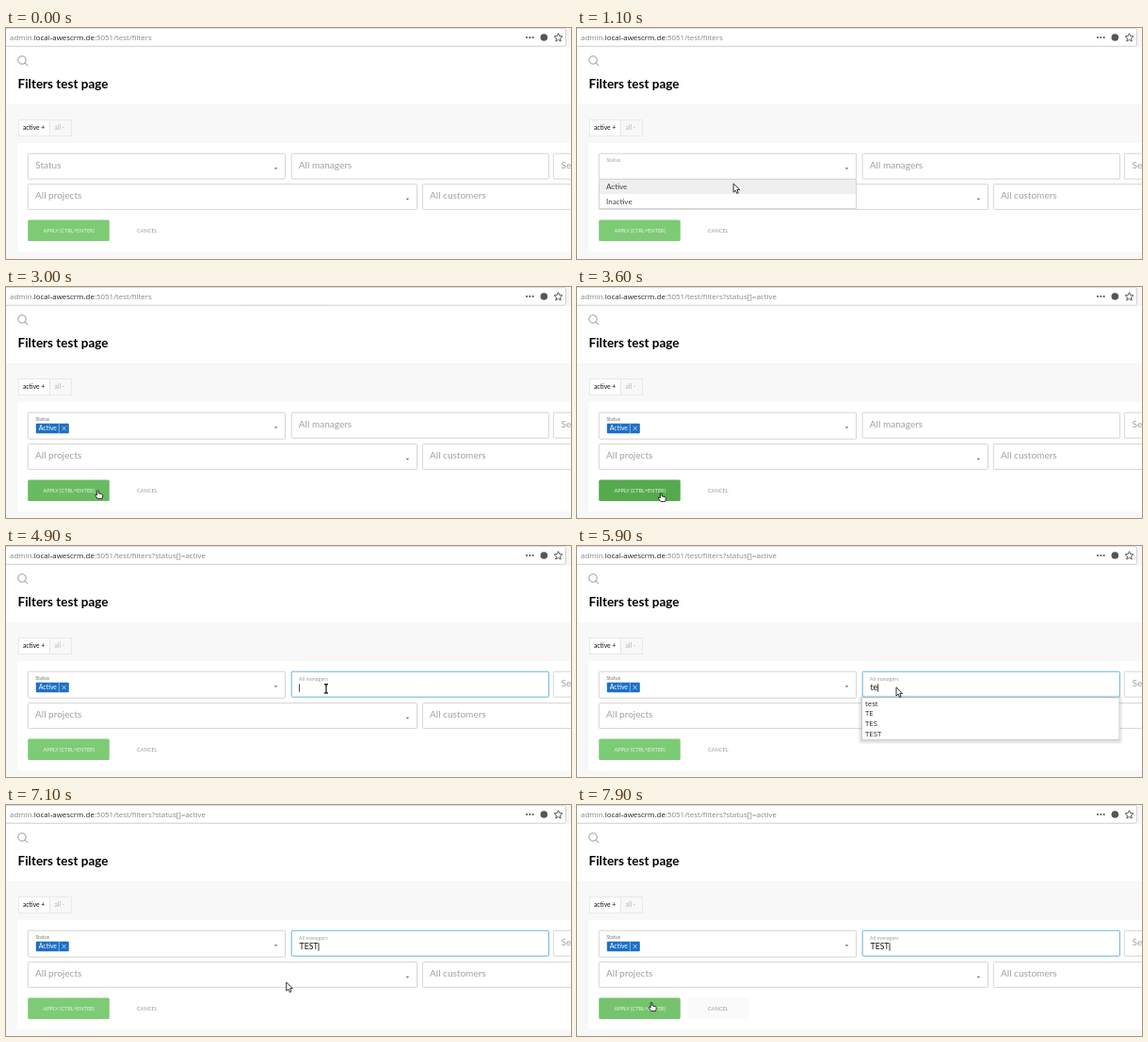
Write an HTML page that moves like this. It is 600 px wide and 245 px high and loops after 8 s.

```html
<!DOCTYPE html>
<html lang="en">
<head>
<meta charset="utf-8">
<title>Filters test page</title>
<style>
  html, body { margin: 0; width: 100%; height: 100%; overflow: hidden; background: #f8f8f8; }
  svg { display: block; width: 600px; height: 245px; font-family: Lato, sans-serif; }
  text { white-space: pre; }
  .ui { font-family: "Open Sans", "Noto Sans", sans-serif; }
  .field { fill: #fff; stroke: #d6d6d6; }
  .hint { font-size: 10.05px; fill: #a0a0a0; }
  .button { font-size: 5.6px; }
  .arrow { fill: #666; }
  .pointer { fill: #fff; stroke: #1c1c1c; stroke-width: .9; stroke-linejoin: round; }
</style>
</head>
<body>
<svg viewBox="0 0 600 245">
  <rect width="600" height="245" fill="#f8f8f8"/>
  <rect y="20" width="600" height="61" fill="#fff"/>

  <g id="addressBar">
    <rect width="600" height="20.5" fill="#f6f6f5"/>
    <rect x="-5" y=".3" width="599.5" height="19" rx="2" fill="#fff" stroke="#d2d2d2"/>
    <text class="ui" x="4" y="13.3" font-size="7.95" fill="#858585">admin.<tspan fill="#222">local-awescrm.de</tspan>:5051/test/filters<tspan id="query"></tspan></text>
    <g fill="#555">
      <circle cx="553" cy="10" r="1.1"/><circle cx="556.3" cy="10" r="1.1"/><circle cx="559.6" cy="10" r="1.1"/>
      <circle cx="571.3" cy="10" r="3.8"/>
    </g>
    <path d="M586.5 5.7l1.3 2.9 3.1.3-2.4 2.1.7 3.1-2.7-1.6-2.7 1.6.7-3.1-2.4-2.1 3.1-.3z" fill="none" stroke="#555"/>
  </g>

  <g fill="none" stroke="#999"><circle cx="17" cy="34" r="4.2"/><path d="M20 37l3.2 3.2"/></g>
  <text x="12.5" y="64" font-size="13.5" font-weight="700" fill="#000">Filters test page</text>

  <rect x="13.5" y="97.5" width="56" height="17" fill="#f8f8f8" stroke="#e9e9e9"/>
  <rect x="14" y="98" width="32" height="16" fill="#fff"/>
  <path d="M46.5 98v16" stroke="#e5e5e5"/>
  <g font-size="6.7">
    <text x="18" y="108" fill="#111">active +</text>
    <text x="51.5" y="108" fill="#b5b5b5">all -</text>
  </g>

  <rect x="12" y="122" width="600" height="116" rx="2" fill="#fff"/>

  <g id="lowerRows">
    <rect class="field" x="23.3" y="165.6" width="413.2" height="26.8" rx="1"/>
    <rect class="field" x="442.3" y="165.6" width="170" height="26.8" rx="1"/>
    <text class="hint" x="31" y="181.4">All projects</text>
    <text class="hint" x="450" y="181.4">All customers</text>
    <path class="arrow" d="M424.6 180.8h3.6l-1.8 1.8z"/>
    <rect id="apply" x="23.2" y="203.5" width="86.6" height="22.5" rx="1.5"/>
    <rect id="cancel" x="118" y="203.5" width="65" height="22.5" rx="1.5" fill="#f4f5f0"/>
    <text class="button" x="39.5" y="216.6" fill="#eaf7e6">APPLY (CTRL+ENTER)</text>
    <text class="button" x="139" y="216.6" fill="#9b9b9b">CANCEL</text>
  </g>

  <rect id="statusBox" class="field" x="23.3" y="133.2" width="273.2" height="27" rx="1"/>
  <rect id="managersBox" class="field" x="303.2" y="133.2" width="273.2" height="27" rx="1"/>
  <rect class="field" x="581.3" y="133.2" width="40" height="27" rx="1"/>
  <text id="statusHint" class="hint">Status</text>
  <text id="managersHint" class="hint">All managers</text>
  <text class="hint" x="589.5" y="149">Se</text>
  <path class="arrow" d="M284.7 148.3h3.6l-1.8 1.8z"/>

  <g id="tag">
    <rect x="31.8" y="144.8" width="35" height="10.4" rx="1" fill="#1d6fc4"/>
    <path d="M56.3 144.8v10.4" stroke="#a5c8ea" stroke-width=".8"/>
    <path d="M59.6 147.8l4 4.4m0-4.4l-4 4.4" stroke="#d5e6f7" stroke-width=".8"/>
    <text x="34.8" y="152.4" font-size="6.9" fill="#fff">Active</text>
  </g>

  <g id="statusList">
    <rect x="23.5" y="160.5" width="273" height="31" fill="#fff" stroke="#d6d6d6"/>
    <rect id="statusHover" x="24" y="161" width="272" height="15" fill="#efefef"/>
    <g font-size="8" fill="#444"><text x="31" y="171.4">Active</text><text x="31" y="186.6">Inactive</text></g>
  </g>

  <text id="typed" x="311.5" y="153" font-size="8.7" fill="#111"></text>
  <path id="caret" stroke="#222" stroke-width=".9"/>
  <g id="suggestions"></g>

  <g id="pointer">
    <path id="arrow" class="pointer" d="M0-.2v9.2l2.1-2 1.5 3.3 1.6-.7-1.4-3.2h2.9z"/>
    <path id="hand" class="pointer" d="M-.8 .8q.8-1 1.6 0v3l3.5.9q1.1.4 1 1.5l-.7 3.4h-4.8l-2.7-3.6q.1-1.3 1.3-.8l.8.8z"/>
    <path id="beam" d="M-2-4.5Q0-4.5 0-3Q0-4.5 2-4.5M0-3.5v8M-2 5Q0 5 0 3.5Q0 5 2 5" fill="none" stroke="#222" stroke-width="1.3"/>
  </g>
</svg>
<script>
const LOOP = 8000, STEP = 100;
const el = id => document.getElementById(id);
const set = (id, attrs) => { for (const k in attrs) el(id).setAttribute(k, attrs[k]); };
const show = (id, on) => { el(id).style.display = on ? "" : "none"; };

// Rows are [time, ...values]; values run linearly between rows.
function track(rows, t) {
  const next = rows.findIndex(row => row[0] > t);
  if (next === 0) return rows[0].slice(1);
  if (next < 0) return rows.at(-1).slice(1);
  const a = rows[next - 1], b = rows[next], p = (t - a[0]) / (b[0] - a[0]);
  return a.slice(1).map((v, i) => v + (b[i + 1] - v) * p);
}
// The latest row's value holds until the next row.
const held = (rows, t) => rows.filter(row => row[0] <= t).at(-1)[1];
const mix = (from, to, p) => `rgb(${from.map((v, i) => Math.round(v + (to[i] - v) * p))})`;

const path = [
  [100, 86, 58], [200, 281, 207], [300, 253, 145], [400, 253, 145], [500, 253, 146],
  [700, 253, 146], [1000, 180, 162], [1300, 138.5, 171.5], [2300, 138.5, 171.5],
  [2400, 150, 156], [2500, 156, 151], [2700, 140, 183], [2900, 105, 212], [3100, 90, 218],
  [3700, 89, 218], [4000, 284, 196], [4300, 333, 153], [4600, 340, 151], [5700, 340, 151],
  [5800, 339, 150], [6300, 339, 150], [6500, 309, 179], [6700, 308.5, 187], [7000, 305, 188],
  [7400, 276, 189], [7500, 265, 196], [7700, 150, 213], [7900, 79, 209]
];
const shapes = [[0, ""], [100, "arrow"], [2900, "hand"], [3800, "arrow"], [4300, "beam"], [5700, "arrow"], [7700, "hand"]];
const typing = [[0, ""], [5700, "t"], [5900, "te"], [6100, "tes"], [6300, "test"], [7100, "TEST"]];
const applyHover = [[2800, 0], [3200, 1], [3800, 1], [4200, 0], [7800, 0], [7900, .2]];
const cancelHover = [[7600, 0], [7700, .9], [7800, .8], [7900, .45]];
const names = ["test", "T", "TE", "TES", "TEST"];

function floatHint(id, x, p, restY, smallY) {
  el(id).style.fontSize = 10.05 - 4.55 * p + "px";
  set(id, { x, y: restY + (smallY - restY) * p });
}

function drawSuggestions(word, open, highlight) {
  show("suggestions", open);
  if (!open) return;
  const items = names.filter(name => name.toLowerCase().startsWith(word));
  const top = 161, pitch = 10.8, height = items.length * pitch + 1;
  const shadow = [4, 3, 2, 1].map(g =>
    `<rect x="${302.5 - g}" y="${top + 1 - g}" width="${273 + 2 * g}" height="${height + 2 * g}" rx="${g}" fill="#000" opacity=".035"/>`).join("");
  const rows = items.map((name, i) => {
    const y = top + .5 + i * pitch;
    const fill = highlight && name === "TEST" ? "#e6e6e6" : "#fff";
    return `<rect x="303" y="${y}" width="272.5" height="${pitch}" fill="${fill}"/><text x="306" y="${y + 8.1}">${name}</text>`;
  }).join("");
  el("suggestions").innerHTML = `${shadow}<rect x="302.5" y="${top}" width="273" height="${height}" fill="#fff" stroke="#c9c9c9"/>
    <g class="ui" font-size="7.8" fill="#222">${rows}</g>`;
}

function render(t) {
  const chosen = t >= 1800, focused = t >= 4500, word = held(typing, t);

  el("query").textContent = t >= 3300 ? "?status[]=active" : "";
  floatHint("statusHint", 31.2, track([[600, 0], [900, 1]], t)[0], 149, 142);
  floatHint("managersHint", 310.8, track([[4400, 0], [4700, 1]], t)[0], 149, 143);
  el("statusHint").style.fill = chosen ? "#777" : "";
  show("statusList", t >= 700 && !chosen);
  show("statusHover", t >= 1000);
  show("tag", chosen);
  set("statusBox", { height: chosen ? 28 : 27 });
  set("lowerRows", { transform: `translate(0 ${chosen ? 1 : 0})` });
  set("apply", { fill: mix([125, 203, 117], [84, 170, 77], track(applyHover, t)[0]) });
  set("cancel", { opacity: track(cancelHover, t)[0] });

  set("managersBox", { style: focused ? "stroke:#69b3dc" : "" });
  el("typed").textContent = word;
  show("caret", focused);
  const caretX = 311.6 + (word ? el("typed").getComputedTextLength() + .4 : 0);
  set("caret", { d: `M${caretX} 146.3v8.4` });
  drawSuggestions(word, t >= 5700 && t < 7100, t >= 6500);

  const shape = held(shapes, t);
  for (const id of ["arrow", "hand", "beam"]) show(id, id === shape);
  set("pointer", { transform: `translate(${track(path, t).join(" ")})` });
}

const start = performance.now();
let last = -1;
function tick() {
  const t = Math.floor((performance.now() - start) % LOOP / STEP) * STEP;
  if (t !== last) render(last = t);
  requestAnimationFrame(tick);
}
tick();
</script>
</body>
</html>
```
